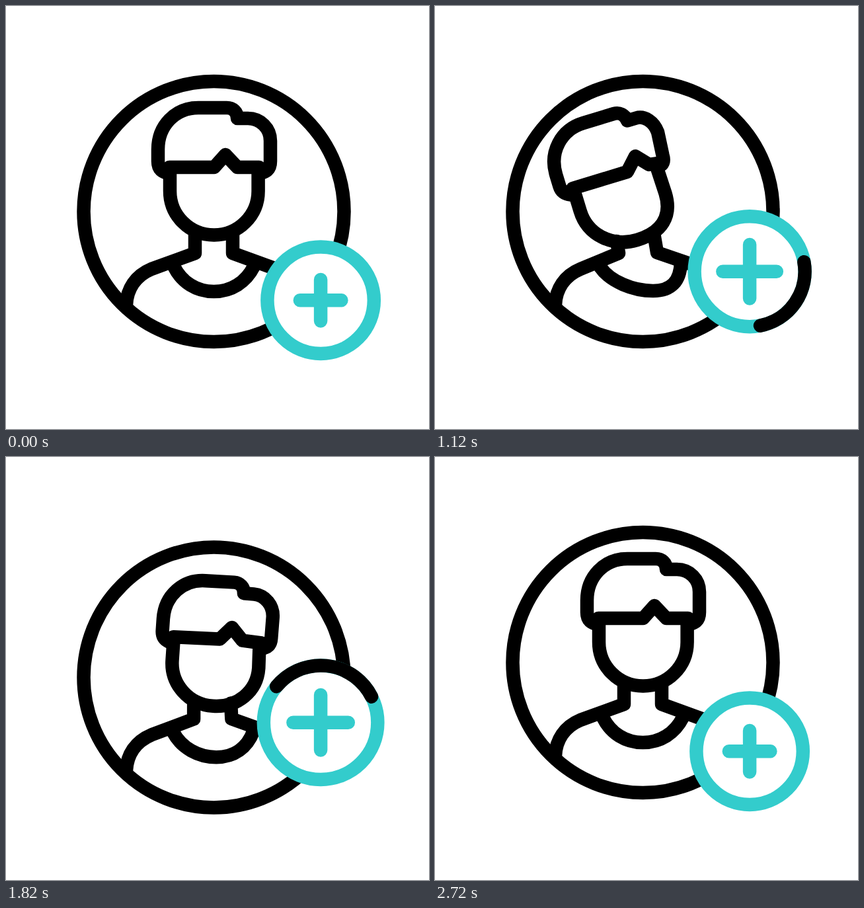
Recreate the animation shown at these times as an HTML page. Size 640x640 px, loop 3000 ms.

```html
<!DOCTYPE html>
<html lang="en">
<head>
<meta charset="utf-8">
<title>Add user</title>
<style>
  html, body { margin: 0; width: 100%; height: 100%; overflow: hidden; background: #fff; }
  svg { display: block; width: 100%; height: 100%; }
  path, circle { fill: none; stroke: #000; stroke-width: 20.5; stroke-linecap: round; stroke-linejoin: round; }
  #ring, #plus { stroke: #33cccc; }
  #ring { fill: #fff; }
</style>
</head>
<body>
<svg viewBox="0 0 640 640">
  <g id="user">
    <circle cx="314.5" cy="311" r="197"/>
    <path id="left"/>
    <path id="right"/>
    <path id="collar"/>
    <path id="face"/>
    <path id="band"/>
    <path id="hair"/>
  </g>
  <g id="badge">
    <circle id="ring"/>
    <path id="arc"/>
    <path id="plus"/>
  </g>
</svg>
<script>
const LOOP = 3000;
const $ = id => document.getElementById(id);
const set = (id, name, value) => $(id).setAttribute(name, value);

// Each head part: facing front, then turned to the side
const head = {
  hair: [
    'M241 252C233 249 230 243 230 235L230 217C230 181 256 154 291 154L334 154C343 154 350 160 350 170L366 170C385 170 400 185 400 204L400 235C400 243 397 249 389 252',
    'M241 252C233 249 229 243 229 235L229 217C229 181 256 154 291 154L340 154C348 154 355 160 356 170L370 170C383 170 394 183 395 200L392 235C392 243 390 247 386 249'
  ],
  band: [
    'M247 244L315 244L332 225L350 244L383 244',
    'M247 244L333.5 244L352 225L368 243L386 246'
  ],
  face: [
    'M248 246L248 280C248 316.8 277.6 346.5 314.8 346.5C351.9 346.5 381.6 316.8 381.6 280L381.6 246',
    'M248 246L248 280C248 317 278 347 318 347C357 347 379 328 379 292L378 246'
  ]
};

// Each body part: at rest, leaning left, leaning right
const body = {
  left: [
    'M182 452C183 428 196 408 220 398L286 374L286 343',
    'M182 452C183 428 196 408 220 398L278 374L275 356',
    'M182 452C183 428 196 408 220 398L286 374L287 350'
  ],
  right: [
    'M447 452C446 428 433 408 409 398L343 374L343 343',
    'M447 452C446 428 433 408 409 398L336 373L331 344',
    'M447 452C446 428 433 408 409 398L343 374L343 352'
  ],
  collar: [
    'M254 394C266 418 288 432 314.5 432C341 432 363 418 375 394',
    'M250 395C265 417 300 431 330 431C358 431 371 416 372 388',
    'M254 394C266 418 288 432 314.5 432C341 432 363 418 375 394'
  ]
};

const PAIR = /(-?[\d.]+) (-?[\d.]+)/g;

function place(path, deg, dx, dy) {
  const cx = 314.5, cy = 279.5, a = deg * Math.PI / 180;
  const c = Math.cos(a), s = Math.sin(a);
  return path.replace(PAIR, (_, x, y) => {
    x -= cx;
    y -= cy;
    return (cx + dx + x * c - y * s).toFixed(3) + ' ' + (cy + dy + x * s + y * c).toFixed(3);
  });
}

function mix(a, b, k) {
  const to = b.match(/-?[\d.]+/g);
  let i = 0;
  return a.replace(/-?[\d.]+/g, n => (+n + (to[i++] - n) * k).toFixed(2));
}

const poses = { ...body };
for (const [id, [front, side]] of Object.entries(head)) {
  poses[id] = [front, place(side, -17, -31.5, 10.9), place(front, 10.3, 12.5, 9)];
}

const clamp = x => Math.min(1, Math.max(0, x));

function ease(t, from, to) {
  const x = clamp((t - from) / (to - from));
  return x * x * (3 - 2 * x);
}

function drawUser(t) {
  for (const [id, [rest, left, right]] of Object.entries(poses)) {
    const d = t < 1220 ? mix(rest, left, ease(t, 200, 1160))
            : t < 2100 ? mix(left, right, ease(t, 1220, 2100))
            : mix(right, rest, ease(t, 2100, 2700));
    set(id, 'd', d);
  }
  const drop = 26.5 * (ease(t, 1520, 1920) - ease(t, 1920, 2305));
  set('user', 'transform', `translate(0 ${drop})`);
}

function drawBadge(t) {
  const y = 445.3 + 24 * ease(t, 200, 600) - 67.6 * ease(t, 600, 1100) + 43.6 * ease(t, 1920, 2700);
  const r = 80.7 + 19 * (ease(t, 1000, 1500) - ease(t, 1500, 2000));
  const arm = 31.3 + 10.5 * (ease(t, 800, 1200) - ease(t, 1800, 2200));
  set('badge', 'transform', `translate(476.1 ${y})`);
  set('ring', 'r', r);
  set('plus', 'd', `M${-arm} 0H${arm}M0 ${-arm}V${arm}`);

  const tip = -10 + 398 * (1 - (1 - clamp((t - 930) / 1200)) ** 1.46);
  const tail = -10 + 398 * ease(t, 1375, 2185);
  const at = deg => {
    const a = deg * Math.PI / 180;
    return `${r * Math.cos(a)} ${r * Math.sin(a)}`;
  };
  const big = tip - tail > 180 ? 1 : 0;
  set('arc', 'd', tip - tail > 2 ? `M${at(tail)}A${r} ${r} 0 ${big} 1 ${at(tip)}` : '');
}

function frame() {
  const t = performance.now() % LOOP;
  drawUser(t);
  drawBadge(t);
  requestAnimationFrame(frame);
}
frame();
</script>
</body>
</html>
```
